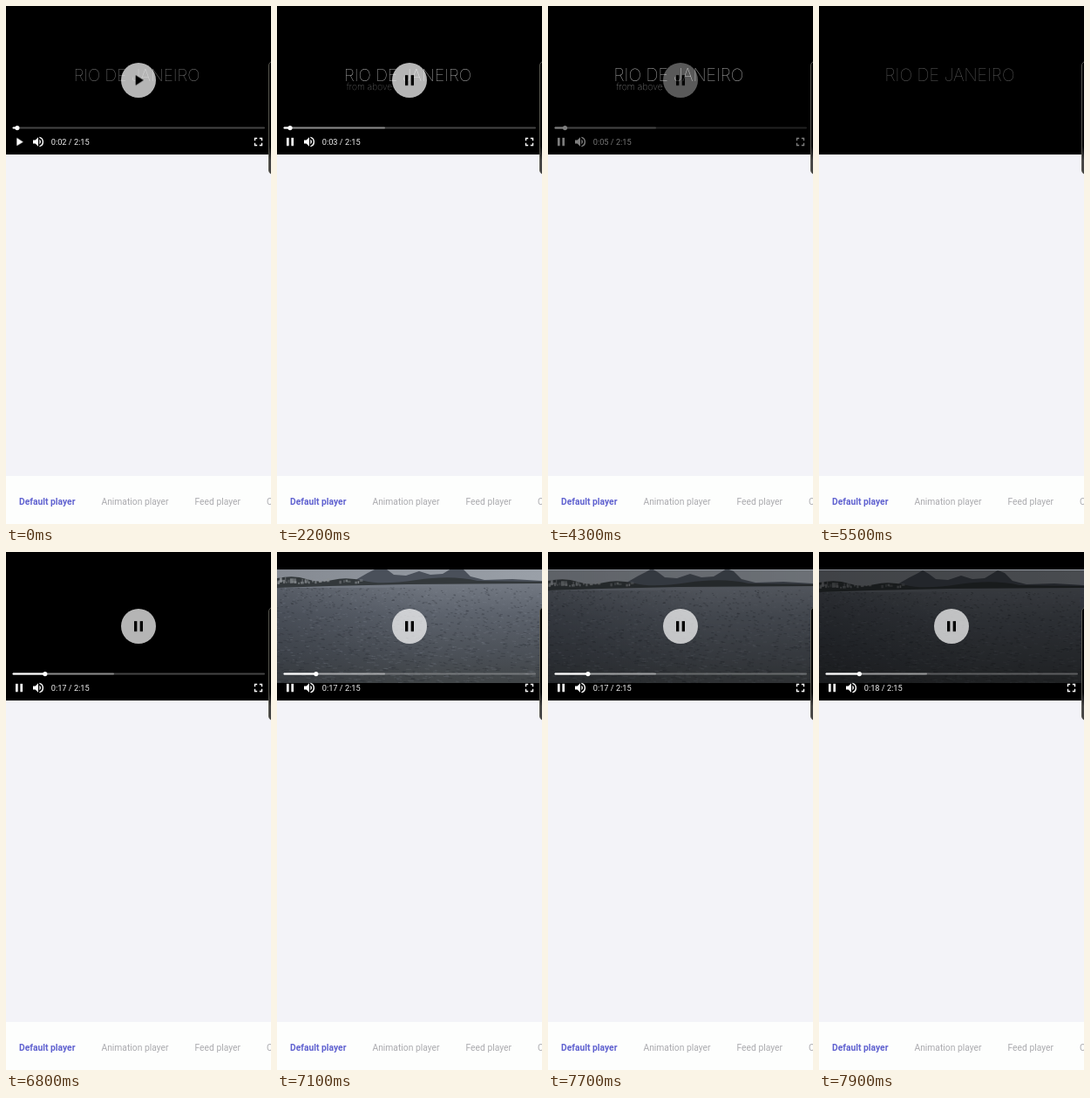
An HTML page that plays this animation: 304x593 px, repeating every 8 s.

```html
<!DOCTYPE html>
<html lang="en">
<head>
<meta charset="utf-8">
<title>Video player</title>
<style>
  html, body { margin: 0; width: 100%; height: 100%; overflow: hidden; background: #f3f3f8; }
  body { position: relative; font-family: Roboto, "Noto Sans", sans-serif; }
  .player { position: absolute; left: 0; top: 0; display: block; background: #000; }
  .next-page {
    position: absolute; left: 301px; top: 63px; width: 12px; height: 128px;
    border: 1px solid #58574f; border-radius: 5px;
    background: linear-gradient(#000 75%, #444 88%);
  }
  nav {
    position: absolute; left: 0; top: 538px; width: 304px; height: 55px;
    display: flex; overflow: hidden; white-space: nowrap;
    background: #fdfefd; color: #aaaaae; font-size: 10.3px; line-height: 59px;
  }
  nav span { flex: none; padding: 0 15px; }
  nav .active { color: #6062d0; font-weight: 700; }

  .title, .sub, .controls, .playing, .paused, .buffer, .video, .view, .dim {
    animation: 8s linear infinite;
  }
  .title { transform-origin: 150px 80px; animation-name: grow; font-family: Inter, Lato, Roboto, sans-serif; font-weight: 100; fill: #fff; }
  .name { animation: name 8s linear infinite; }
  .sub { animation-name: sub; }
  .controls { animation-name: controls; }
  .paused { animation-name: paused; animation-timing-function: step-end; }
  .playing, .buffer { animation-name: playing; animation-timing-function: step-end; }
  .video { animation-name: video; animation-timing-function: step-end; }
  .view { animation-name: tilt; }
  .dim { animation-name: dim; }
  .time { font-size: 9.25px; fill: #f0f0f0; }

  @keyframes grow { 0%, 15% { transform: scale(1); } 54%, 100% { transform: scale(1.03); } }
  @keyframes name {
    0%, 13% { opacity: .55; } 26%, 56% { opacity: .8; } 69% { opacity: .42; }
    78% { opacity: .22; } 80%, 100% { opacity: 0; }
  }
  @keyframes sub {
    0%, 14% { opacity: 0; } 27.5% { opacity: .6; } 40%, 57% { opacity: .75; } 67%, 100% { opacity: 0; }
  }
  @keyframes controls {
    0%, 51.9% { opacity: 1; } 55.6%, 71.2% { opacity: 0; } 75%, 100% { opacity: 1; }
  }
  @keyframes paused { 0% { opacity: 1; } 13.75%, 100% { opacity: 0; } }
  @keyframes playing { 0% { opacity: 0; } 13.75%, 100% { opacity: 1; } }
  @keyframes video { 0% { opacity: 0; } 88.75%, 100% { opacity: 1; } }
  @keyframes tilt { 0%, 92.5% { transform: translateY(-5px); } 98.75%, 100% { transform: none; } }
  @keyframes dim { 0%, 93% { opacity: 0; } 98.75%, 100% { opacity: .52; } }
</style>
</head>
<body>
<svg class="player" width="304" height="170" viewBox="0 0 304 170">
  <defs>
    <clipPath id="frame"><rect y="20.5" width="304" height="129"/></clipPath>
    <linearGradient id="sky" x1="0" y1="0" x2="1" y2="0">
      <stop offset="0" stop-color="#858a92"/><stop offset="1" stop-color="#9aa0a8"/>
    </linearGradient>
    <linearGradient id="water" x1="0" y1="0" x2="0" y2="1">
      <stop offset="0" stop-color="#737983"/><stop offset=".3" stop-color="#5c626c"/>
      <stop offset=".7" stop-color="#4a4f56"/><stop offset="1" stop-color="#3f4344"/>
    </linearGradient>
    <linearGradient id="shade" x1="0" y1="0" x2="1" y2="0">
      <stop offset="0" stop-color="#1c2028" stop-opacity=".3"/><stop offset=".6" stop-color="#1c2028" stop-opacity="0"/>
    </linearGradient>
    <path id="play" d="M8 5v14l11-7z"/>
    <path id="pause" d="M6 19h4V5H6zM14 5v14h4V5z"/>
  </defs>

  <g class="title">
    <text class="name" x="150" y="85.5" font-size="19" text-anchor="middle">RIO DE JANEIRO</text>
    <text class="sub" x="80.5" y="95.8" font-size="10.2">from above</text>
  </g>

  <g class="video" clip-path="url(#frame)">
    <rect y="20" width="304" height="130" fill="#000"/>
    <g class="view">
      <rect y="15" width="304" height="40" fill="url(#sky)"/>
      <path fill="#4a505a" d="M70 44L90 37 104 29 112 25 119 21 126 25 134 31 148 32 163 27 176 31 190 30 205 21 213 24 222 33 238 37 270 36 304 38V46H70z"/>
      <path fill="#33383b" d="M0 35Q20 31 34 36T64 37T100 38T160 37T230 38L304 39V43L150 43 60 45 0 47z"/>
      <g id="city" fill="#8b8f93"></g>
      <path fill="url(#water)" d="M0 46L60 44 150 42 304 41V160H0z"/>
      <rect y="46" width="304" height="114" fill="url(#shade)"/>
      <path id="ripples" fill="none" stroke="#24282d" stroke-width=".7" opacity=".42"/>
      <path id="glints" fill="none" stroke="#9ea5ad" stroke-width=".6" opacity=".24"/>
    </g>
    <rect class="dim" y="20" width="304" height="130"/>
  </g>

  <g class="controls">
    <circle cx="152" cy="85" r="20" fill="#fff" fill-opacity=".71"/>
    <g transform="translate(142 75) scale(.8333)">
      <use class="paused" href="#play"/><use class="playing" href="#pause"/>
    </g>
    <rect x="7.5" y="138.6" width="289.5" height="2" rx="1" fill="#fff" fill-opacity=".27"/>
    <rect class="buffer" x="7.5" y="138.6" width="116.5" height="2" rx="1" fill="#fff" fill-opacity=".38"/>
    <rect id="played" x="7.5" y="138.6" width="5" height="2" rx="1" fill="#fff"/>
    <circle id="thumb" cx="13" cy="139.6" r="2.6" fill="#fff"/>
    <g fill="#fff">
      <g transform="translate(7 147.5) scale(.6667)">
        <use class="paused" href="#play"/><use class="playing" href="#pause"/>
      </g>
      <path transform="translate(29 147.5) scale(.6667)" d="M3 9v6h4l5 5V4L7 9zm13.500 3a4.500 4.500 0 0 0-2.500-4v8a4.500 4.500 0 0 0 2.500-4zM14 3.200v2.100a7 7 0 0 1 0 13.400v2.100a9 9 0 0 0 0-17.600z"/>
      <path transform="translate(281.500 147.500) scale(.6667)" d="M7 14H5v5h5v-2H7zM5 10h2V7h3V5H5zm12 7h-3v2h5v-5h-2zM14 5v2h3v3h2V5z"/>
    </g>
    <text class="time" id="time" x="51.7" y="158.7">0:02 / 2:15</text>
  </g>
</svg>
<div class="next-page"></div>
<nav>
  <span class="active">Default player</span><span>Animation player</span><span>Feed player</span><span>C</span>
</nav>

<script>
  const LOOP = 8000, DURATION = 135;
  const $ = id => document.getElementById(id);

  let seed = 11;
  const random = () => (seed = seed * 16807 % 2147483647) / 2147483647;

  // Ripples grow longer and sparser toward the viewer
  function ripplePath(count) {
    let d = '';
    for (let i = 0; i < count; i++) {
      const depth = random() ** 1.2;
      const x = random() * 310 - 6, y = 46 + depth * 112;
      const w = 2 + depth * 5 * random();
      d += `M${x.toFixed(1)} ${y.toFixed(1)}l${w.toFixed(1)} ${(random() - .3).toFixed(1)}`;
    }
    return d;
  }
  $('ripples').setAttribute('d', ripplePath(900));
  $('glints').setAttribute('d', ripplePath(700));

  let houses = '';
  for (let i = 0; i < 34; i++) {
    const x = random() ** 1.7 * 105, h = 1.5 + random() * 5 * (1 - x / 140);
    const y = 42 - random() * 3 - h;
    houses += `<rect x="${x.toFixed(1)}" y="${y.toFixed(1)}" width="${(1 + random() * 3).toFixed(1)}" height="${h.toFixed(1)}" opacity="${(.3 + random() * .6).toFixed(2)}"/>`;
  }
  $('city').innerHTML = houses;

  // Playback position in seconds: paused, playing, seek, buffering, playing
  function position(ms) {
    if (ms < 6200) return 2.5 + Math.max(0, ms - 1200) / 1000;
    return 17.4 + Math.max(0, ms - 7200) / 1000;
  }

  const start = performance.now();
  function render() {
    const s = position((performance.now() - start) % LOOP);
    const x = 289.5 * s / DURATION;
    $('played').setAttribute('width', x);
    $('thumb').setAttribute('cx', 7.5 + x);
    $('time').textContent = `0:${String(Math.floor(s)).padStart(2, '0')} / 2:15`;
    requestAnimationFrame(render);
  }
  render();
</script>
</body>
</html>
```
